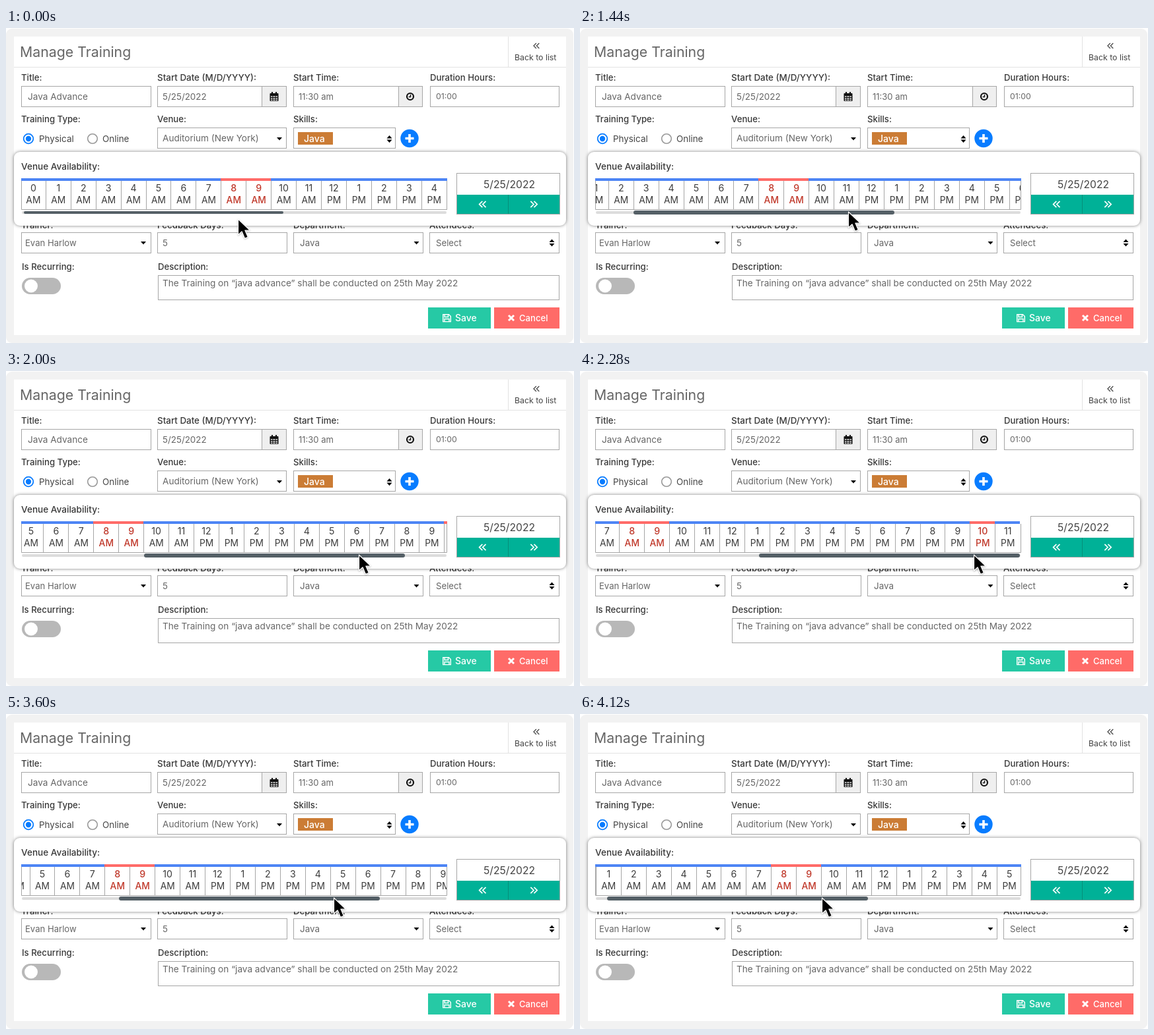
Animation, 860 px wide and 478 px high, one loop 4160 ms. Source, as an HTML page:

```html
<!DOCTYPE html>
<html lang="en">
<head>
<meta charset="utf-8">
<title>Manage Training</title>
<style>
  html, body { margin: 0; width: 100%; height: 100%; overflow: hidden; background: #fff; }
  svg { display: block; width: 100%; height: 100%; }
  text { font: 400 13.4px Inter, "Open Sans", sans-serif; fill: #666; }
  .label { font-weight: 500; font-size: 13.2px; fill: #383838; }
  .cell { font-size: 13.8px; fill: #3c3c3c; text-anchor: middle; }
  .busy { fill: #c0392b; font-weight: 500; }
  .dark { fill: #444; }
  .light { fill: #fff; font-weight: 500; }
  .field { fill: #fff; stroke: #a6a6a6; }
  .addon { fill: #efefef; stroke: #a6a6a6; }
  .line { fill: none; stroke: #a6a6a6; }
  .panel { fill: #fff; filter: drop-shadow(0 0 2.5px rgba(0, 0, 0, .5)); }
  .pointer { filter: drop-shadow(0 1px 1px rgba(0, 0, 0, .25)); }
</style>
</head>
<body>
<svg id="stage" viewBox="0 0 860 478">
  <defs><clipPath id="view"><rect x="23" y="227" width="645" height="49"/></clipPath></defs>
  <rect y="1" width="859" height="477" rx="9" fill="#f2f2f2"/>
  <rect x="12" y="13" width="836" height="453" fill="#fff"/>
  <path d="M12 59.5H848M760.5 13V59" fill="none" stroke="#e2e2e2"/>
  <g id="form"></g>
  <rect class="panel" x="12" y="188" width="836" height="112" rx="9"/>
  <g id="dates"></g>
  <g clip-path="url(#view)"><g id="strip"></g></g>
  <path class="line" d="M23.5 232V275.5H667.5V232"/>
  <rect x="24" y="278" width="643" height="4" rx="2" fill="#dcdcdc"/>
  <rect id="thumb" fill="#545f66"/>
  <path id="pointer" class="pointer" d="M0 0V24L5.6 18.8 10 29.3 14.8 27.3 10.4 17H17.8Z"
    stroke="#fff" stroke-width="1.2" stroke-linejoin="round"/>
</svg>
<script>
const $ = id => document.getElementById(id);
const text = (x, y, s, cls = '', size = 0) =>
  `<text x="${x}" y="${y}" class="${cls}"${size ? ` style="font-size:${size}px"` : ''}>${s}</text>`;
const label = (x, y, s, size) => text(x, y, s, 'label', size);
const rect = (x, y, w, h, fill, rx = 0) =>
  `<rect x="${x}" y="${y}" width="${w}" height="${h}" rx="${rx}" fill="${fill}"/>`;
const box = (x, y, w, h = 31, cls = 'field') =>
  `<rect class="${cls}" x="${x + .5}" y="${y + .5}" width="${w}" height="${h}"/>`;
const path = (d, stroke, width) =>
  `<path d="${d}" fill="none" stroke="${stroke}" stroke-width="${width}"/>`;
const circle = (x, y, r, fill, stroke = 'none', width = 0) =>
  `<circle cx="${x}" cy="${y}" r="${r}" fill="${fill}" stroke="${stroke}" stroke-width="${width}"/>`;
const caret = (x, y) => `<path d="M${x - 4} ${y - 2}h8l-4 4.5z"/>`;
const sorter = (x, y) => `<path d="M${x - 4} ${y - 1}h8l-4-4.5zM${x - 4} ${y + 1}h8l-4 4.5z"/>`;
// Double chevron; r is negative when it points left.
const chevrons = (x, y, r, color, width) =>
  path([-1, 0].map(k => `M${x + k * Math.abs(r) * 1.1 + (r < 0 ? .3 : 0)} ${y - Math.abs(r)}`
    + (r < 0 ? `m${-r} 0l${r} ${-r}l${-r} ${-r}` : `l${r} ${r}l${-r} ${r}`)).join(''), color, width);

const GREEN = '#26c9a5', RED = '#ff6b68', BLUE = '#4d85f5', ACCENT = '#087cff';

$('form').innerHTML = [
  text(21, 43.5, 'Manage Training', '', 21.3),
  chevrons(803, 27, -4, '#444', 1.2),
  text(770, 49, 'Back to list', 'dark', 12.3),

  label(23, 80, 'Title:'), label(229, 80, 'Start Date (M/D/YYYY):', 13.4),
  label(435, 80, 'Start Time:'), label(642, 80, 'Duration Hours:'),
  box(23, 88, 196), box(229, 88, 195), box(435, 88, 195), box(642, 88, 195),
  box(387, 88, 37, 31, 'addon'), box(594, 88, 36, 31, 'addon'),
  text(33, 109, 'Java Advance', '', 13.6), text(237, 109, '5/25/2022', '', 13.4),
  text(443, 108.5, '11:30 am', '', 13), text(651, 108, '01:00', '', 12.3),
  rect(399.5, 99, 13, 12, '#111', 1), rect(402, 97, 2, 4, '#111'), rect(408, 97, 2, 4, '#111'),
  path('M401 104h10M401 107h10M401 109.5h10', '#efefef', 1.3),
  path('M403.9 102.5v8M408 102.5v8', '#111', 1),
  circle(612, 104, 5, 'none', '#111', 2.2), path('M612.5 101v3.5h-2.8', '#111', 1.4),

  label(23, 143, 'Training Type:'), label(229, 143, 'Venue:'), label(435, 143, 'Skills:'),
  circle(34, 168, 7.3, '#fff', ACCENT, 1.8), circle(34, 168, 4.2, ACCENT),
  circle(131, 168, 7.3, '#fff', '#999', 1.6),
  text(50, 172.5, 'Physical', 'dark'), text(146, 172.5, 'Online', 'dark'),
  box(229, 151, 195), text(237, 171.5, 'Auditorium (New York)', '', 13.6), caret(414, 168),
  box(435, 151, 154), rect(442, 158, 53, 19, '#cb7c35'),
  text(451, 172.5, 'Java', 'light', 14), sorter(580.5, 168.5),
  circle(611, 167.5, 13.7, ACCENT), path('M604.5 167.5h13M611 161v13', '#fff', 3.6),

  label(23, 303.5, 'Trainer:'), label(229, 303.5, 'Feedback Days:'),
  label(435, 303.5, 'Department:'), label(641, 303.5, 'Attendees:'),
  ...[23, 229, 435, 641].map(x => box(x, 310, 196)),
  text(29, 330.5, 'Evan Harlow', '', 13.1), text(237, 331, '5'),
  text(445, 330.5, 'Java'), text(651, 330.5, 'Select', '', 13.2),
  caret(208, 326), caret(621.5, 326), sorter(826.5, 326),

  label(24, 367, 'Is Recurring:'), label(230, 367, 'Description:'),
  rect(24, 379, 59, 25, '#b8b8b8', 12.5), circle(38, 391.5, 10, '#fff'),
  box(230, 375, 607, 37),
  text(237, 392, 'The Training on “java advance” shall be conducted on 25th May 2022', '', 13.6),

  rect(639, 424, 95, 32, GREEN), text(680, 445, 'Save', 'light', 14),
  path('M661.7 434.7h8.8l2.8 2.8v8.1h-11.6zM664 435v3.5h5.5v-3.5M664 445.5v-4h7v4', '#fff', 1.4),
  rect(739, 424, 99, 32, RED), text(777, 445, 'Cancel', 'light', 13.1),
  path('M761 436l8 8M769 436l-8 8', '#fff', 3),
].join('');

$('dates').innerHTML = [
  label(23, 215, 'Venue Availability:', 13.6),
  box(682, 220, 156, 62), text(723, 243, '5/25/2022', 'dark', 15.7),
  rect(683, 253, 155, 29, '#00b197'), path('M760.5 253V282', '#078e7a', 1),
  chevrons(721.5, 267.5, -4.7, '#fff', 1.7), chevrons(799.5, 267.5, 4.7, '#fff', 1.7),
].join('');

const LEFT = 22.4, PITCH = 37.93, edge = i => Math.floor(LEFT + i * PITCH);
$('strip').innerHTML = Array.from({ length: 24 }, (_, i) => {
  const busy = [8, 9, 22].includes(i), cls = busy ? 'cell busy' : 'cell';
  const x = edge(i), mid = LEFT + (i + .5) * PITCH;
  return rect(x, 228, edge(i + 1) - x, 4, busy ? RED : BLUE)
    + path(`M${x + .5} 232V276`, '#a6a6a6', 1)
    + text(mid, 248, i > 12 ? i - 12 : i, cls, 14.2)
    + text(mid, 266, i < 12 ? 'AM' : 'PM', cls);
}).join('');

// [ms, strip scroll, thumb travel]
const KEYS = [[0, 0, 0], [1200, 0, 0], [1720, 120, 120], [2280, 266, 245],
  [3240, 266, 245], [3280, 256, 235], [3600, 176, 145], [4120, 36, 15]];
const LOOP = 4160, STEP = 40;

function pose(t) {
  const i = Math.max(1, KEYS.findIndex(k => k[0] >= t));
  const a = KEYS[i - 1], b = KEYS[i], p = (t - a[0]) / (b[0] - a[0]);
  return [1, 2].map(n => Math.round(a[n] + (b[n] - a[n]) * p));
}

function draw(now) {
  const t = Math.floor(now % LOOP / STEP) * STEP;
  const [scroll, travel] = pose(t);
  const grow = t >= 1000 ? 1 : 0;
  const size = { x: 27 - grow + travel, y: 278 - grow, width: 393 + 2 * grow, height: 4 + 2 * grow, rx: 2 + grow };
  for (const k in size) $('thumb').setAttribute(k, size[k]);
  $('strip').setAttribute('transform', `translate(${-scroll} 0)`);
  $('pointer').setAttribute('transform', `translate(${351.5 + travel} ${t >= 1040 ? 279 : 290})`);
}

const start = performance.now();
function tick() {
  draw(performance.now() - start);
  requestAnimationFrame(tick);
}
tick();
</script>
</body>
</html>
```
